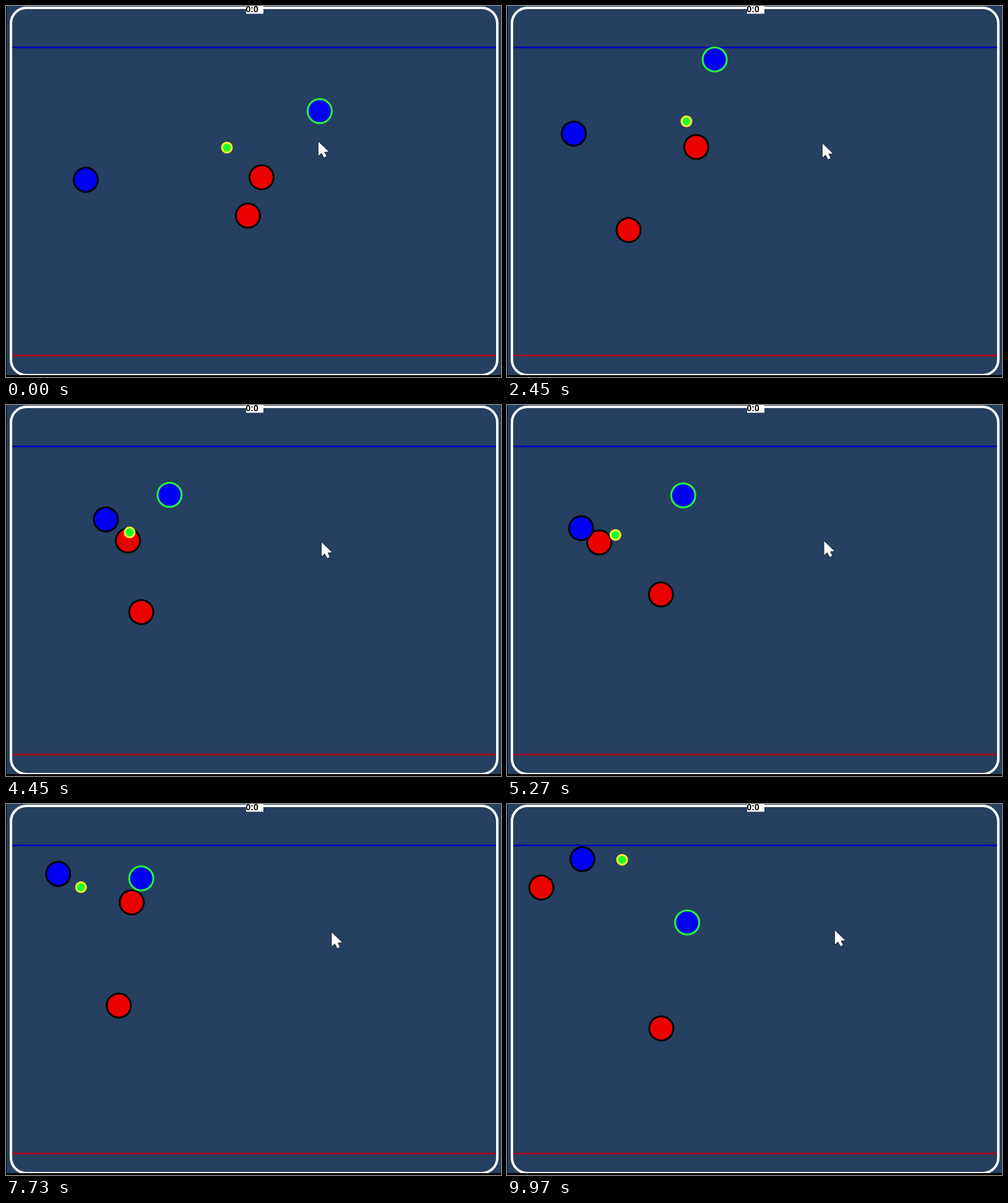
Recreate the animation shown at these times as an HTML page with a canvas. Size 800 by 600 pixels, loop 10000 ms.

```html
<!DOCTYPE html>
<html lang="en">
<head>
<meta charset="utf-8">
<title>Disc football</title>
<style>
  html, body { margin: 0; width: 100%; height: 100%; overflow: hidden; background: #254060; }
  canvas { display: block; width: 800px; height: 600px; }
</style>
</head>
<body>
<canvas id="stage" width="800" height="600"></canvas>
<script>
const ctx = document.getElementById('stage').getContext('2d');
const LOOP = 10000;
const STEP = 30;
const BLACK = '#000', RED = '#eb0000', BLUE = '#0000f2';

// All discs pass their key points on the same beats (seconds)
const beats = [0, 1.24, 3.64, 5.27, 6.85, 8.64, 9.97];

// A detour bows the path outwards while the discs swing round on leg 1
const discs = [
  { rim: BLACK, fill: RED, detour: [0, 75],
    points: [[391, 339], [258, 242], [189, 356], [249, 306], [219, 305], [164, 351], [250, 363]] },
  { rim: BLACK, fill: RED,
    points: [[413, 277], [343, 252], [264, 213], [149, 222], [250, 176], [123, 146], [55, 135]] },
  { rim: BLACK, fill: BLUE,
    points: [[129, 281], [44, 256], [188, 169], [119, 199], [72, 135], [108, 98], [122, 89]] },
  { rim: '#24ff38', fill: BLUE, detour: [70, -42],
    points: [[507, 170], [342, 131], [248, 140], [285, 146], [268, 115], [188, 141], [292, 192]] },
  { rim: '#fff02c', fill: '#20ff28', radius: 9.5,
    points: [[357, 229], [336, 192], [235, 196], [175, 210], [200, 164], [57, 107], [187, 90]] }
];

const clamp = (v, low, high) => Math.min(high, Math.max(low, v));
const ease = (time, from, to) => {
  const u = clamp((time - from) / (to - from), 0, 1);
  return u * u * (3 - 2 * u);
};

// Speed through a key point, taken from its neighbours
function velocity(points, i, axis) {
  const a = Math.max(i - 1, 0), b = Math.min(i + 1, beats.length - 1);
  const rate = (p, q) => (points[q][axis] - points[p][axis]) / (beats[q] - beats[p]);
  if (a === i || b === i) return rate(a, b);
  const before = beats[i] - beats[a], after = beats[b] - beats[i];
  return (rate(a, i) * after + rate(i, b) * before) / (before + after);
}

function positionAt({ points, detour = [0, 0] }, time) {
  const leg = clamp(beats.findLastIndex(beat => time >= beat), 0, beats.length - 2);
  const span = beats[leg + 1] - beats[leg];
  const u = clamp((time - beats[leg]) / span, 0, 1);
  const bow = leg === 1 ? Math.sin(Math.PI * u) : 0;
  return [0, 1].map(axis =>
    points[leg][axis] * (1 + 2 * u) * (1 - u) ** 2 +
    points[leg + 1][axis] * u * u * (3 - 2 * u) +
    span * velocity(points, leg, axis) * u * (1 - u) ** 2 -
    span * velocity(points, leg + 1, axis) * u * u * (1 - u) +
    detour[axis] * bow);
}

function drawDisc(disc, time) {
  const [x, y] = positionAt(disc, time);
  const { radius = 21, rim, fill } = disc;
  const circle = (r, color) => {
    ctx.beginPath();
    ctx.arc(x, y, r, 0, Math.PI * 2);
    ctx.fillStyle = color;
    ctx.fill();
  };
  circle(radius, rim);
  circle(radius - 3, fill);
}

function rect(color, x, y, w, h) {
  ctx.fillStyle = color;
  ctx.fillRect(x, y, w, h);
}

function drawField() {
  rect('#254060', 0, 0, 800, 600);
  rect('#0000c0', 10, 65.7, 782, 2.6);
  rect('#b4001c', 10, 564, 782, 2.6);
  ctx.beginPath();
  ctx.roundRect(8, 3, 786, 594, 25);
  ctx.strokeStyle = '#fff';
  ctx.lineWidth = 4;
  ctx.stroke();
  rect(BLACK, 0, 0, 1, 600);
  rect(BLACK, 0, 597, 800, 3);
  rect('#fff', 388, 0, 28, 12.5);
  ctx.fillStyle = BLACK;
  ctx.font = 'bold 14px "Liberation Sans", sans-serif';
  ctx.fillText('0:0', 387.5, 10);
}

function drawCursor(time) {
  const nudge = ease(time, 0, 1), drift = ease(time, 4.15, 9);
  ctx.save();
  ctx.translate(505 + 5 * nudge + 20 * drift, 219 + 3 * nudge - 18 * drift);
  ctx.strokeStyle = '#14202e';
  ctx.lineWidth = 1.5;
  ctx.fillStyle = '#fff';
  const arrow = new Path2D('M0 .5V23L5 18.5 9 26 13 24 9.5 17 16.5 16.5Z');
  ctx.stroke(arrow);
  ctx.fill(arrow);
  ctx.restore();
}

const start = performance.now();
function tick() {
  const elapsed = (performance.now() - start) % LOOP;
  const time = Math.floor(elapsed / STEP) * STEP / 1000;
  drawField();
  discs.forEach(disc => drawDisc(disc, time));
  drawCursor(time);
  requestAnimationFrame(tick);
}
tick();
</script>
</body>
</html>
```
